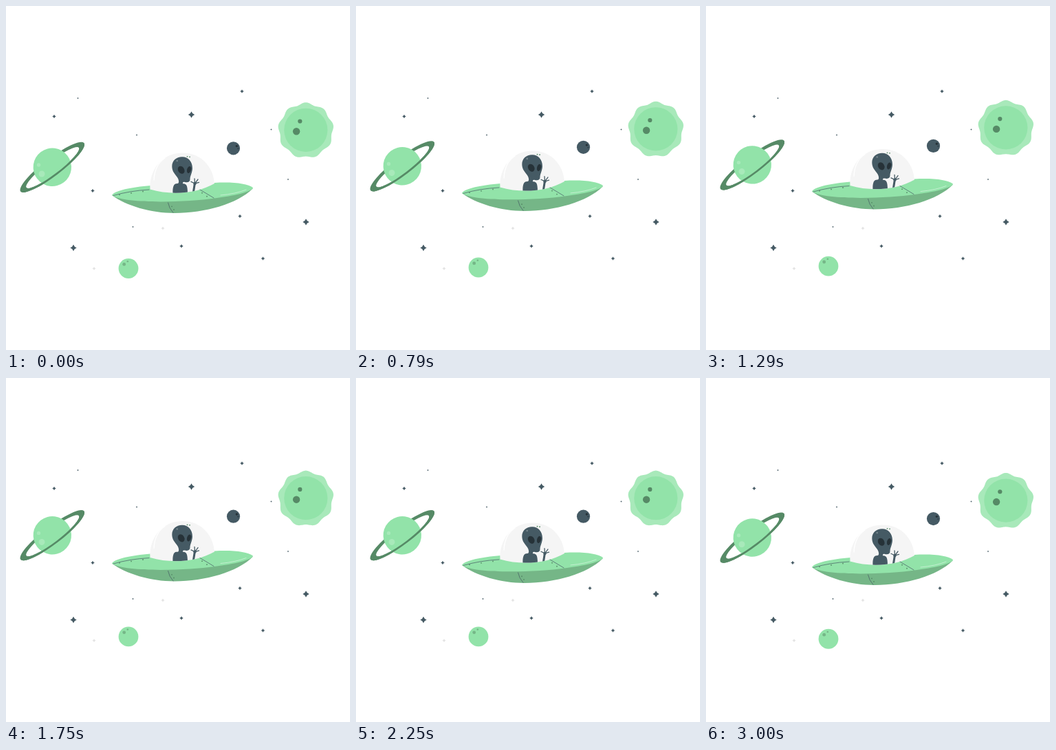
Animation of 500x500 px, one loop 3040 ms. Source, as an HTML page:

```html
<!DOCTYPE html>
<html lang="en">
<head>
<meta charset="utf-8">
<title>Saucer among planets</title>
<style>
  html, body { margin: 0; width: 100%; height: 100%; overflow: hidden; background: #fff; }
  svg { display: block; width: 100%; height: 100%; }
  .green { fill: #92e3a9; }
  .pale { fill: #a8e9ba; }
  .shade { fill: #75b687; }
  .deep { fill: #568a66; }
  .slate { fill: #455a64; }
  .ink { fill: #263238; }
  .faint { fill: #e3e3e3; }
  .line { fill: none; stroke: #455a64; stroke-linecap: round; stroke-linejoin: round; }
</style>
</head>
<body>
<svg viewBox="0 0 500 500">
  <defs>
    <path id="ring" fill-rule="evenodd" d="M-58 0A58 12.8 0 0 1 58 0A58 12.8 0 0 1-58 0ZM-48 .8A48 9.3 0 0 0 48 .8A48 9.3 0 0 0-48 .8Z"/>
    <path id="star" d="M0-1Q.25-.25 1 0Q.25 .25 0 1Q-.25 .25-1 0Q-.25-.25 0-1Z"/>
    <clipPath id="front"><rect x="-60" width="120" height="20"/></clipPath>
    <clipPath id="glass"><use href="#dome"/></clipPath>
  </defs>

  <g id="stars"></g>

  <g id="planets">
    <g transform="translate(67.3 234.3) rotate(-37.3)">
      <use href="#ring" class="deep"/>
      <circle class="green" r="27.7"/>
      <use href="#ring" class="deep" clip-path="url(#front)"/>
    </g>
    <circle class="pale" cx="47.5" cy="231" r="2.7"/>
    <circle class="pale" cx="52" cy="244" r="4.5"/>

    <g transform="translate(435.8 180.3)">
      <path id="halo" class="pale"/>
      <circle class="green" r="31.6"/>
      <circle class="deep" cx="-13.7" cy="2" r="5.2"/>
      <circle class="deep" cx="-8.5" cy="-12.8" r="3.1"/>
    </g>

    <circle class="slate" cx="330.5" cy="206.8" r="9.6"/>
    <circle class="ink" cx="335.4" cy="203.6" r="1.7"/>
    <circle class="ink" cx="337.2" cy="207.2" r=".8"/>

    <circle class="green" cx="178" cy="381.5" r="14.4"/>
    <circle class="shade" cx="171.7" cy="375.4" r="2.4"/>
    <circle class="shade" cx="176.8" cy="371.2" r="1.3"/>
  </g>

  <g id="saucer">
    <path class="shade" d="M154 275C174 290 210 301 245 301C290 300.5 336 288 359 265L200 268Z"/>
    <path class="green" d="M154 275C158 268 182 263.5 210 261L303 257C330 255.5 351 258 359 264C358 270 331 276 303 279.5C262 285.500 172 288 154 275Z"/>
    <path id="dome" fill="#f5f5f5" d="M209.5 266.5C208 240 225 214 256 213.5C282 213 301 232 303 258C279 272 242 276 209.5 266.5Z"/>
    <path class="line" style="stroke:#fff" stroke-width="1.3" d="M215 253Q216 231 231 221"/>

    <g class="slate" clip-path="url(#glass)">
      <path d="M242 238C239 227 246 219.5 256 219.3C266 219.3 272 228 270.8 238C270 244 267.500 247 267.5 252C267.5 256 264 257 260 256C257.5 255.500 256.7 256.500 257 258.3C262 258.3 264 260 264 273H242.500C242 266 243 259 247 258.3C250 258.3 251.5 258 251 254C250.5 248 244 245 242 238Z"/>
      <path class="line" stroke-width="3" d="M272.3 271L274.3 258.5"/>
      <path class="line" stroke-width="1.3" d="M269 255.3L274.5 258L274 250.8M279 252L274.5 258L280.5 256.3"/>
      <circle cx="274.5" cy="258" r="2.2"/>
      <ellipse class="ink" rx="4.5" ry="5.9" transform="translate(254.7 238.3) rotate(-32)"/>
      <ellipse class="ink" rx="2.9" ry="5.2" transform="translate(266 238) rotate(15)"/>
      <circle cx="248.7" cy="225" r="1.3" fill="#75858c"/>
    </g>

    <path class="line" stroke-width=".7" d="M156 275.5Q180 268.500 208 267M282 267L302 279M235.5 286Q237 294 243 300.5"/>
    <path class="line" style="stroke:#c8f1d4" stroke-width=".9" d="M312 275Q334 273 349 267"/>
    <g id="rivets" class="deep"></g>
  </g>
</svg>
<script>
const LOOP = 3040, TURN = 2 * Math.PI;
const el = id => document.getElementById(id);
const range = n => [...Array(n).keys()];

const scatter = (points, size, color = 'slate') => points.map(([x, y]) =>
  `<use href="#star" class="${color}" transform="translate(${x} ${y}) scale(${size})"/>`).join('');

el('stars').innerHTML =
  scatter([[269.5, 158], [436, 314], [98, 351.5]], 4.7) +
  scatter([[70, 160.5], [343, 124], [126, 268.5], [255, 349], [340, 305.5], [373.5, 367]], 2.8) +
  scatter([[104.5, 134], [190, 187.5], [385.5, 179.5], [410, 252], [184.5, 321]], 1.3) +
  scatter([[228, 323], [128, 381.5]], 2.6, 'faint');

// Rivets run in short rows beside each seam
const row = (n, x, y, dx, dy) => range(n).map(i =>
  `<circle cx="${x + i * dx}" cy="${y + i * dy}" r=".9"/>`).join('');
el('rivets').innerHTML = row(3, 165, 274.3, 17, -2.4) + row(2, 285, 271.7, 7, 5) +
  row(2, 241, 291.3, 3, 4.7) + row(2, 263.5, 218.800, 3.5, .5);

// Wavy corona: nine lobes around the disc
const corona = range(180).map(i => {
  const a = i / 180 * TURN;
  const r = 39.2 + 1.5 * Math.sin(9 * a + TURN / 4) - .6 * Math.cos(a);
  return `${(r * Math.sin(a)).toFixed(2)} ${(-r * Math.cos(a)).toFixed(2)}`;
});
el('halo').setAttribute('d', `M${corona.join('L')}Z`);

const lift = (id, y) => el(id).setAttribute('transform', `translate(0 ${-y})`);

function draw(t) {
  // The planets ease in for 2 s, then run the same curve backwards
  lift('planets', 7 * (1 - Math.abs(1 - t / 2000)) ** 1.65);
  lift('saucer', 2.9 * (1 - Math.cos(TURN * t / LOOP)));
}

const start = performance.now();
function tick() {
  draw((performance.now() - start) % LOOP);
  requestAnimationFrame(tick);
}
tick();
</script>
</body>
</html>
```
